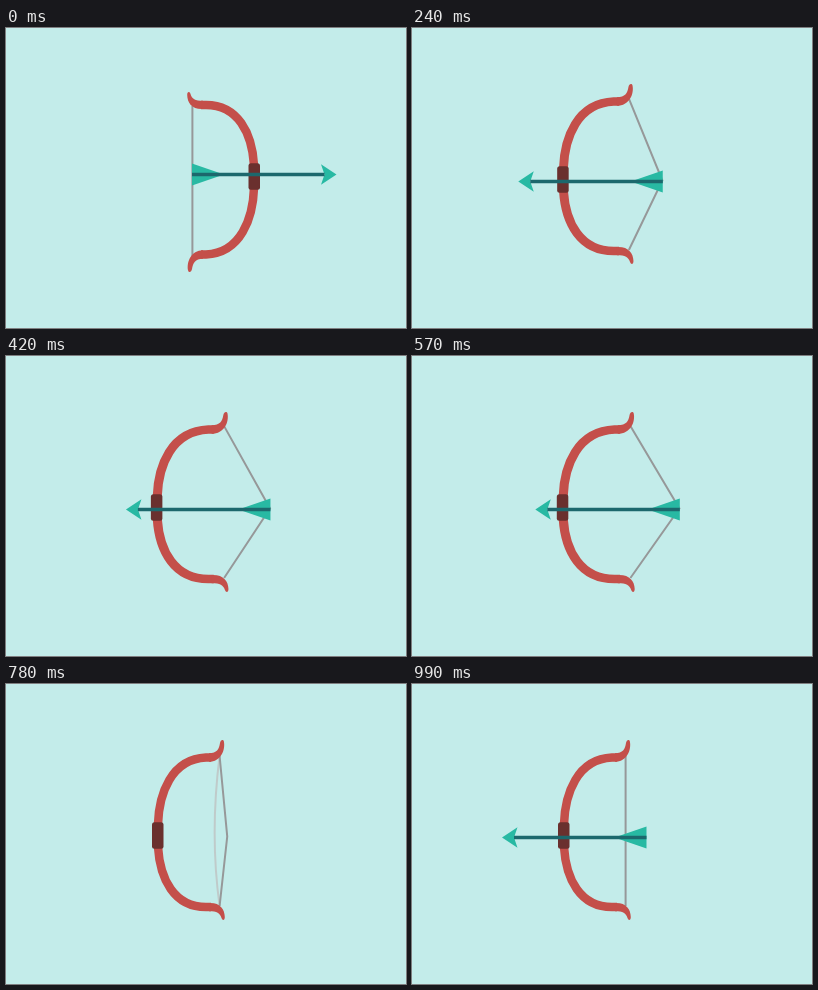
Write an HTML page with a canvas that moves like this. It is 400 px wide and 300 px high and loops after 1.02 s.

```html
<!DOCTYPE html>
<html>
<head>
<meta charset="utf-8">
<title>Bow and arrow</title>
<style>
html, body { margin: 0; width: 100%; height: 100%; overflow: hidden; background: #c3ecea; }
canvas { display: block; width: 400px; height: 300px; }
</style>
</head>
<body>
<canvas id="stage" width="400" height="300"></canvas>
<script>
const ctx = document.getElementById('stage').getContext('2d');
const LOOP = 1020, STEPS = 29;
const AXIS = 153.5, REST = 214, DRAW = 53.8, LENGTH = 144.5;
const RED = '#c44f4a', BROWN = '#6a302e', TEAL = '#28b9a3', SHAFT = '#1c686d';

const topHorn = new Path2D('M203 69.3C211 69.3 213 65 214 59C214.6 55.7 217.2 55 217.9 57.5C219.5 66 215 77.8 203 77.8Z');
const lowHorn = new Path2D('M203 219C214 218.4 218.6 225 218.8 233C218.8 236.5 216.5 236.8 215.5 234C214 229 211 227.2 203 227.2Z');
const limbs = new Path2D('M205 73.5H200C165 75 153 110 152 140V163C154 195 168 223 200 223.1H205');

// Five steps per 180 ms, the last of them held twice as long
function stepAt(ms) {
  return Math.floor(ms / 180) * 5 + Math.min(4, Math.floor(ms % 180 / 30));
}

function pose(n) {
  if (n < 20) {
    const left = Math.max(0, 1 - n / 16);
    const pull = 1 - left * left;
    return { pull, bend: pull * DRAW, tail: REST + pull * DRAW, ghost: 0 };
  }
  const k = n - 20;
  const bend = n < 25 ? 17 * Math.pow(-0.67, k) : 0;
  const tail = n < 25
    ? REST + DRAW - 130 - 190 * k
    : REST + 20.5 * (STEPS - n) ** 2;
  return { pull: 0, bend, tail, ghost: -0.65 * bend };
}

function polygon(color, points) {
  ctx.fillStyle = color;
  ctx.beginPath();
  points.forEach(([x, y]) => ctx.lineTo(x, y));
  ctx.closePath();
  ctx.fill();
}

function drawString({ pull, bend, ghost }) {
  const x = 213.6 + 4.8 * pull;
  const top = 72 - 2 * pull, low = 222;
  ctx.lineWidth = 2;
  if (ghost) {
    ctx.strokeStyle = '#bfcbca';
    ctx.beginPath();
    ctx.moveTo(x, top);
    ctx.quadraticCurveTo(x + 2 * ghost, 150, x, low);
    ctx.stroke();
  }
  ctx.strokeStyle = '#969899';
  ctx.beginPath();
  ctx.moveTo(x, top);
  ctx.lineTo(213.6 + bend, 152.5);
  ctx.lineTo(x, low);
  ctx.stroke();
}

function drawBow(pull) {
  ctx.save();
  ctx.translate(163, 0);
  ctx.scale(1 + 0.07 * pull, 1);
  ctx.translate(-163, 0);
  ctx.strokeStyle = ctx.fillStyle = RED;
  ctx.lineWidth = 8.5;
  ctx.stroke(limbs);
  ctx.fill(topHorn);
  ctx.fill(lowHorn);
  ctx.restore();
  ctx.fillStyle = BROWN;
  ctx.beginPath();
  ctx.roundRect(146 - 1.2 * pull, 138.3, 11.5, 26.5, 2.5);
  ctx.fill();
}

function drawArrow(tail) {
  const tip = tail - LENGTH;
  polygon(TEAL, [[tip, AXIS], [tip + 15.5, AXIS - 10.3], [tip + 12, AXIS], [tip + 15.5, AXIS + 10.3]]);
  polygon(TEAL, [[tail - 32, AXIS], [tail, AXIS - 11], [tail, AXIS + 11]]);
  ctx.fillStyle = SHAFT;
  ctx.fillRect(tip + 12, AXIS - 1.75, LENGTH - 12, 3.5);
}

function render(ms) {
  const n = stepAt(ms % LOOP);
  const p = pose(n);
  ctx.fillStyle = '#c3ecea';
  ctx.fillRect(0, 0, 400, 300);
  ctx.save();
  // The loop opens with the bow turned half a circle
  if (n === 0) {
    ctx.translate(400, 300);
    ctx.rotate(Math.PI);
  }
  drawString(p);
  drawBow(p.pull);
  drawArrow(p.tail);
  ctx.restore();
}

const start = performance.now();
function tick() {
  render(performance.now() - start);
  requestAnimationFrame(tick);
}
tick();
</script>
</body>
</html>
```
